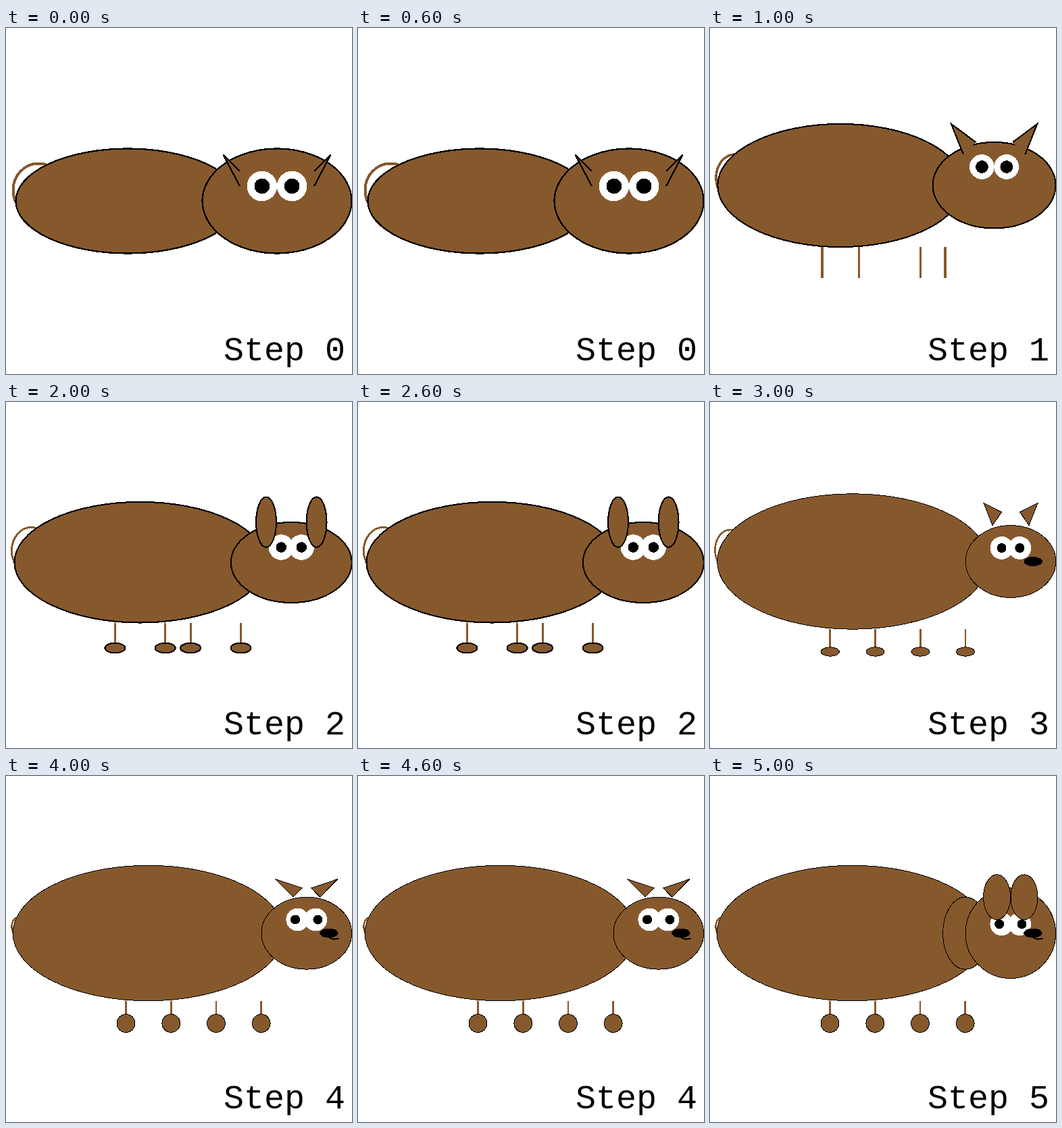
These frames come from a looping animation (512x512 px, 6 s). An HTML page:

```html
<!DOCTYPE html>
<html lang="en">
<head>
<meta charset="utf-8">
<title>Drawing an animal step by step</title>
<style>
  html, body { margin: 0; width: 100%; height: 100%; overflow: hidden; background: #fff; }
  svg { display: block; width: 100vw; height: 100vh; shape-rendering: crispEdges; }
  text { font: 50px "Liberation Mono", monospace; white-space: pre; }
</style>
</head>
<body>
<svg id="stage" viewBox="0 0 512 512"></svg>
<script>
const BROWN = '#86592d';
const STEP_MS = 1000;

// Ellipses are [cx, cy, rx, ry]. Ears list the left one; the right is mirrored at the head centre.
const steps = [
  {
    line: 2.3, limb: 4,
    tail: [48, 240, 37.5, 39.5], body: [180, 256, 165.5, 77.5], head: [401, 256, 110.5, 77.5],
    eyes: { y: 234, white: 22.3, pupil: 11.3, gap: 22.2 },
    ear: { points: [346, 234, 321.5, 187.5, 346, 212] }
  },
  {
    line: 2.1, limb: 3.6,
    tail: [37, 221.5, 28, 34.5], body: [193, 233, 181.7, 91], head: [420.6, 232.7, 91, 63.7],
    eyes: { y: 205.5, white: 18.4, pupil: 9.4, gap: 18.2 },
    ear: { points: [375, 187.3, 357, 142, 393.3, 169] },
    legs: { x: [166, 220.5, 311.5, 348], top: 323.5, bottom: 369.5 }
  },
  {
    line: 2.1, limb: 3,
    tail: [37, 220, 28.5, 34.5], body: [198.5, 237.2, 186, 89.3], head: [422.3, 237.5, 89.5, 59.5],
    eyes: { y: 215, white: 18.8, pupil: 7.8, gap: 15 },
    ear: { oval: [385, 177.7, 14.9, 37.2] },
    legs: { x: [161.3, 235.7, 273, 347.5], top: 326.5, bottom: 364, foot: [14.9, 7.4] }
  },
  {
    line: 1, limb: 2.67,
    tail: [30, 219, 22.5, 30], body: [211, 236, 200.3, 100.2], head: [445, 236, 66.8, 53.4],
    eyes: { y: 216, white: 17, pupil: 7, gap: 13.4 },
    ear: { points: [405, 149.5, 431.5, 163, 418, 182.5], closed: true },
    nose: [478.2, 236, 13.7, 7],
    legs: { x: [177.8, 244.6, 311.4, 378], top: 336, bottom: 369.5, foot: [13.4, 6.7] }
  },
  {
    line: 1, limb: 2.67,
    tail: [16, 223, 7.5, 13], body: [210.5, 232.5, 200.3, 100.2], head: [444.8, 232.7, 66.8, 53.4],
    eyes: { y: 212.5, white: 17, pupil: 7, gap: 13.4, pupilGap: 16.7 },
    ear: { points: [398.5, 152.5, 438, 165.7, 425, 179.2], closed: true },
    nose: [478, 232.5, 13.7, 7], mouth: true,
    legs: { x: [177.5, 244.3, 311, 377.7], top: 332.5, bottom: 366, foot: [13.4, 13.4] }
  }
];
steps.push({
  ...steps[4],
  neck: [378, 232.7, 33.4, 53.4], head: [444.8, 232.7, 66.8, 66.8],
  eyes: { ...steps[4].eyes, y: 219.2 },
  ear: { oval: [424.6, 179.2, 20, 33.4] }
});

const oval = ([cx, cy, rx, ry], style = '') =>
  `<ellipse cx="${cx}" cy="${cy}" rx="${rx}" ry="${ry}" ${style}/>`;
const spot = (x, y, r, color) => oval([x, y, r, r], `fill="${color}" stroke="none"`);

function drawLegs({ x, top, bottom, foot }, width) {
  const limbs = x.map(v => `M${v} ${top}V${bottom}`).join('');
  const feet = foot ? x.map(v => oval([v, bottom, ...foot])).join('') : '';
  return `<path d="${limbs}" stroke="${BROWN}" stroke-width="${width}"/>${feet}`;
}

function drawEyes({ y, white, pupil, gap, pupilGap = gap }, cx) {
  const pair = (offset, r, color) => spot(cx - offset, y, r, color) + spot(cx + offset, y, r, color);
  return pair(gap, white, '#fff') + pair(pupilGap, pupil, '#000');
}

function drawEars({ oval: shape, points, closed }, cx) {
  const ear = shape ? oval(shape) : `<path d="M${points.join(' ')}${closed ? 'Z' : ''}"/>`;
  return `${ear}<g transform="translate(${2 * cx}) scale(-1 1)">${ear}</g>`;
}

function drawStep(s, index) {
  const cx = s.head[0];
  return `<g fill="${BROWN}" stroke="#000" stroke-width="${s.line}">` +
    oval(s.tail, `fill="none" stroke="${BROWN}" stroke-width="${s.limb}"`) +
    oval(s.body) +
    (s.legs ? drawLegs(s.legs, s.limb) : '') +
    (s.neck ? oval(s.neck) : '') +
    oval(s.head) +
    drawEyes(s.eyes, cx) +
    drawEars(s.ear, cx) +
    (s.nose ? oval(s.nose, 'fill="#000" stroke="none"') : '') +
    (s.mouth ? '<path d="M477 238Q484 244 492.5 240" fill="none" stroke-width="2"/>' : '') +
    `</g><text x="322" y="492">Step ${index}</text>`;
}

const stage = document.getElementById('stage');
stage.innerHTML = steps.map((s, i) => `<g>${drawStep(s, i)}</g>`).join('');

const share = 1 / steps.length;
const blink = [
  { opacity: 1, offset: 0 }, { opacity: 1, offset: share },
  { opacity: 0, offset: share }, { opacity: 0, offset: 1 }
];
[...stage.children].forEach((scene, i) => scene.animate(blink, {
  duration: steps.length * STEP_MS,
  delay: (i - steps.length) * STEP_MS,
  iterations: Infinity
}));
</script>
</body>
</html>
```
